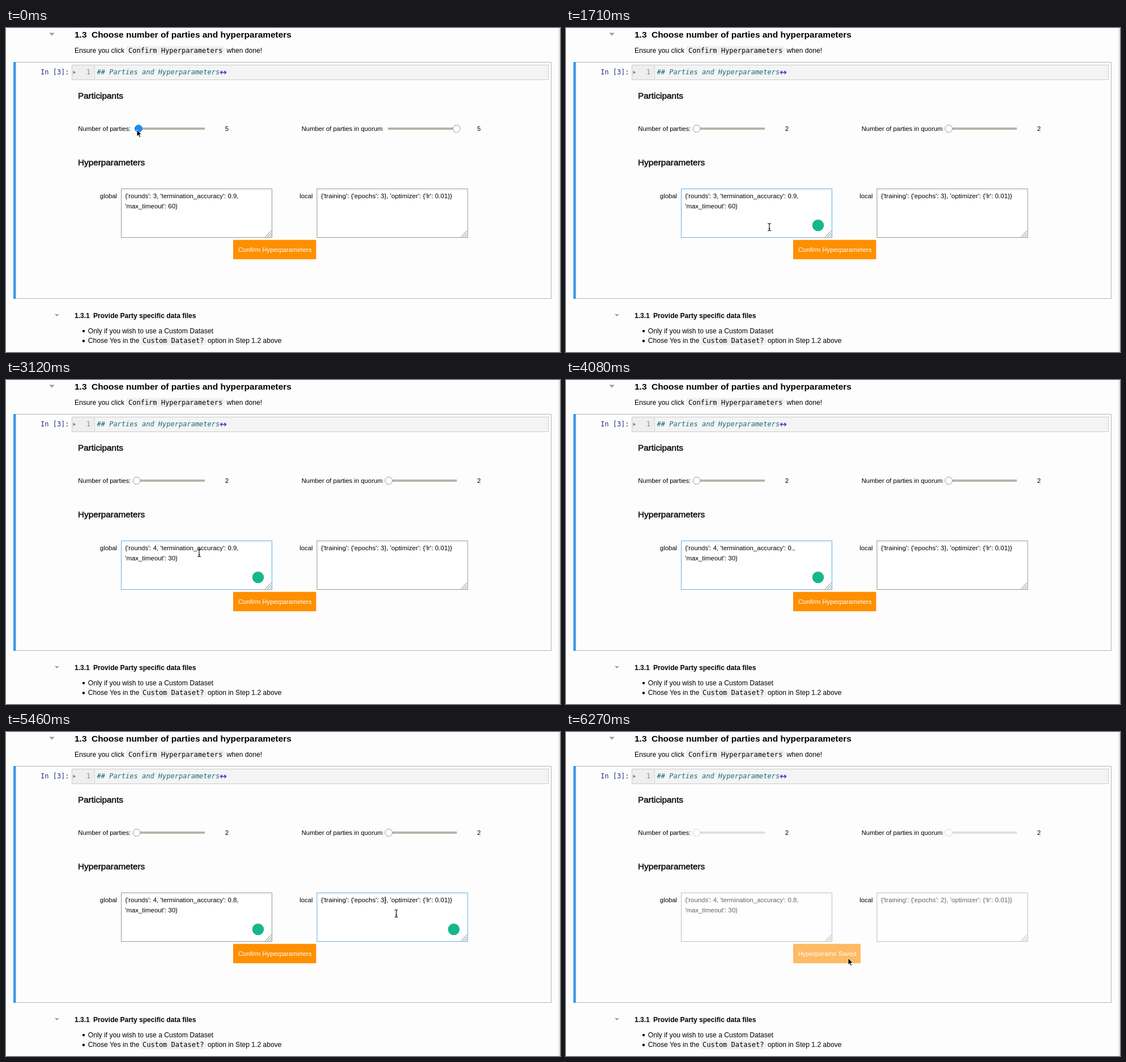
Write an HTML page that moves like this. It is 978 px wide and 573 px high and loops after 6.3 s.

```html
<!DOCTYPE html>
<html lang="en">
<head>
<meta charset="utf-8">
<title>Hyperparameters</title>
<style>
  html, body { margin: 0; width: 100%; height: 100%; overflow: hidden; background: #fdfdfd; }
  svg { display: block; width: 978px; height: 573px; }
  text { font: 11.3px "Liberation Sans", Arial, sans-serif; fill: #000; }
  .body { font-size: 12.1px; }
  .title { font-size: 15.46px; font-weight: bold; }
  .subtitle { font-size: 12.05px; font-weight: bold; }
  .section { font-size: 15.3px; stroke: #000; stroke-width: .4px; }
  .code { font: 12px "DejaVu Sans Mono", monospace; }
  .comment { font-style: italic; fill: #13706c; }
  .label { text-anchor: end; }
  .chip { fill: #f0f0f0; }
  .toggle { fill: #a6a6a6; }
  .track { fill: #b7b6a8; }
  .knob { fill: #fff; stroke: #9b9b9b; }
  .knob.on { fill: #1e8bea; stroke: #1e8bea; }
  .box { fill: #fff; stroke: #969696; }
  .box.on { stroke: #64aeea; }
  .grip { fill: none; stroke: #777; }
  .badge { fill: #15b78b; }
  .button { fill: #ff8f00; }
  .button + text { fill: #fff; }
  .off .dim { opacity: .6; }
  .off .slider { opacity: .42; }
</style>
</head>
<body>
<svg id="stage" viewBox="0 0 978 573">
  <defs>
    <path id="grip" class="grip" d="M0 11L11 0M4 11L11 4M8 11L11 8"/>
  </defs>
  <rect width="978" height="573" fill="#fdfdfd"/>
  <rect x="975" width="3" height="573" fill="#e6e6e6"/>

  <path class="toggle" d="M76 8.5h10l-5 5.5z"/>
  <text class="title" x="121" y="16.8">1.3</text>
  <text class="title" x="151" y="16.8">Choose number of parties and hyperparameters</text>
  <text class="body" x="121" y="44">Ensure you click</text>
  <rect class="chip" x="212" y="32" width="174" height="16" rx="1"/>
  <text class="code" x="216" y="44">Confirm Hyperparameters</text>
  <text class="body" x="389.5" y="44">when done!</text>

  <rect x="13.5" y="60.5" width="949" height="418" fill="none" stroke="#b5b5b5"/>
  <rect x="13" y="60" width="4.5" height="419" fill="#3f9ae8"/>
  <text class="code" x="61" y="82" style="fill:#26317f">In [3]:</text>
  <rect x="116.5" y="65.5" width="841" height="26" fill="#f4f4f4" stroke="#cbcbcb"/>
  <rect x="117" y="66" width="39" height="25" fill="#eee"/>
  <path d="M156.5 66V91" stroke="#d6d6d6"/>
  <path d="M118.5 75.8L123.5 78.5L118.5 81.2z" fill="#888"/>
  <text class="code" x="142" y="82" style="fill:#888">1</text>
  <text class="code comment" x="160.5" y="82">## Parties and Hyperparameters</text>
  <path d="M379 78.5H388M381.5 75.5L378.5 78.5L381.5 81.5M385.5 75.5L388.5 78.5L385.5 81.5" fill="none" stroke="#4126dc" stroke-width="1.4"/>

  <text class="section" x="127" y="124.8">Participants</text>
  <text x="127.3" y="182">Number of parties:</text>
  <g class="slider">
    <rect class="track" x="231" y="176" width="120" height="4"/>
    <circle id="partyKnob" class="knob" cy="178" r="6.5"/>
  </g>
  <text id="partyCount" x="386.7" y="182"></text>
  <text x="521.7" y="182">Number of parties in quorum</text>
  <g class="slider">
    <rect class="track" x="674" y="176" width="122" height="4"/>
    <circle id="quorumKnob" class="knob" cy="178" r="6.5"/>
  </g>
  <text id="quorumCount" x="831.7" y="182"></text>

  <text class="section" x="127" y="242.8">Hyperparameters</text>
  <text class="label" x="196" y="301">global</text>
  <g class="dim">
    <rect id="globalBox" class="box" x="203.5" y="284.5" width="266" height="86"/>
    <use href="#grip" x="457.5" y="358.5"/>
    <text id="rounds" x="210.3" y="301.3" style="font-size:11.42px"></text>
    <text id="timeout" x="210.3" y="318.6" style="font-size:11.42px"></text>
  </g>
  <text class="label" x="541.5" y="301">local</text>
  <g class="dim">
    <rect id="localBox" class="box" x="549" y="284.5" width="266" height="86"/>
    <use href="#grip" x="803" y="358.5"/>
    <text id="training" x="556" y="301.3" style="font-size:11.64px"></text>
  </g>
  <path id="caret" d="M669.5 291V304" stroke="#000"/>
  <circle id="globalBadge" class="badge" cx="445" cy="349" r="10.3"/>
  <circle id="localBadge" class="badge" cx="790.5" cy="349" r="10.3"/>

  <g class="dim">
    <rect id="button" class="button" x="401" y="374.7" height="34.3"/>
    <text id="caption" x="409.7" y="396.2"></text>
  </g>

  <path class="toggle" d="M86 506h8l-4 4.3z"/>
  <text class="subtitle" x="121" y="512.5">1.3.1</text>
  <text class="subtitle" x="154" y="512.5">Provide Party specific data files</text>
  <circle cx="137" cy="536" r="2.2"/>
  <text class="body" x="144.8" y="539.5">Only if you wish to use a Custom Dataset</text>
  <circle cx="137" cy="553.5" r="2.2"/>
  <text class="body" x="144.8" y="557">Chose Yes in the</text>
  <rect class="chip" x="237.5" y="545" width="115" height="16" rx="1"/>
  <text class="code" x="241" y="557">Custom Dataset?</text>
  <text class="body" x="356" y="557">option in Step 1.2 above</text>

  <path id="arrow" d="M0 0V11.6L2.7 9.2L4.6 13.5L6.6 12.6L4.7 8.5H8.4z" fill="#000" stroke="#fff" stroke-width=".9"/>
  <path id="beam" d="M-3 -6.5Q0 -6.5 0 -4.5Q0 -6.5 3 -6.5M0 -4.5V4.5M-3 6.5Q0 6.5 0 4.5Q0 6.5 3 6.5M-1.5 2.5H1.5" fill="none" stroke="#111" stroke-width="1.2"/>
</svg>
<script>
const LOOP = 6300, STEP = 30, start = performance.now();
const el = {};
document.querySelectorAll('[id]').forEach(node => el[node.id] = node);

// Pointer stops: time, x, y
const path = [
  [0, 231, 180], [210, 227, 181], [300, 227, 181], [630, 680, 181], [690, 682, 181],
  [780, 695, 186], [1080, 695, 186], [1500, 360, 345], [1710, 359, 352],
  [1950, 268, 300], [2280, 268, 300], [2550, 293, 317], [2880, 293, 317],
  [3120, 341, 306], [3480, 407, 300], [4290, 407, 300], [4890, 669, 300],
  [5130, 669, 300], [5460, 689, 321], [5760, 689, 321], [6060, 498, 400], [6300, 498, 400]
];
const typing = [[2100, 2280], [2640, 2850], [3840, 4290], [5550, 5760]];

const within = (t, a, b) => t >= a && t < b;
const show = (node, on) => node.style.display = on ? '' : 'none';

// Latest value whose start time has passed: pick(t, first, time, value, ...)
function pick(t, value, ...steps) {
  for (let i = 0; i < steps.length; i += 2) if (t >= steps[i]) value = steps[i + 1];
  return value;
}

function pointerAt(t) {
  const i = path.findIndex(stop => stop[0] > t);
  const [t0, x0, y0] = path[i - 1], [t1, x1, y1] = path[i];
  const p = (t - t0) / (t1 - t0), ease = p * p * (3 - 2 * p);
  return [x0 + (x1 - x0) * ease, y0 + (y1 - y0) * ease];
}

function drawPointer(t) {
  const [x, y] = pointerAt(t);
  const inBox = within(y, 284, 371) && (within(x, 203, 470) || within(x, 548, 816));
  const hidden = typing.some(([a, b]) => within(t, a, b));
  show(el.arrow, !hidden && !inBox);
  show(el.beam, !hidden && inBox);
  for (const node of [el.arrow, el.beam]) node.setAttribute('transform', `translate(${x} ${y})`);
}

function draw(t) {
  const saved = t >= 6120;
  const parties = pick(t, 5, 90, 4, 150, 3, 210, 2);
  el.stage.classList.toggle('off', saved);

  el.partyCount.textContent = el.quorumCount.textContent = parties;
  el.partyKnob.setAttribute('cx', 230.5 + (parties - 2) * 1.17);
  el.quorumKnob.setAttribute('cx', parties > 2 ? 795.5 : 675.5);
  el.partyKnob.classList.toggle('on', t < 960);
  el.quorumKnob.classList.toggle('on', within(t, 660, 1500));

  const rounds = pick(t, '3', 2130, '', 2220, '4');
  const accuracy = pick(t, '9', 3930, '', 4200, '8');
  const seconds = pick(t, '60', 2670, '0', 2790, '30');
  const epochs = pick(t, '3', 5580, '', 5700, '2');
  el.rounds.textContent = `{'rounds': ${rounds}, 'termination_accuracy': 0.${accuracy},`;
  el.timeout.textContent = `'max_timeout': ${seconds}}`;
  el.training.textContent = `{'training': {'epochs': ${epochs}}, 'optimizer': {'lr': 0.01}}`;

  el.globalBox.classList.toggle('on', within(t, 1500, 5010));
  el.localBox.classList.toggle('on', within(t, 5010, 6090));
  show(el.globalBadge, within(t, 1560, 6120));
  show(el.localBadge, within(t, 5070, 6120));
  show(el.caret, within(t, 5040, 5550));

  el.button.setAttribute('width', saved ? 119 : 146.5);
  el.caption.textContent = saved ? 'Hyperparams Saved' : 'Confirm Hyperparameters';
  drawPointer(t);
}

function tick() {
  const t = (performance.now() - start) % LOOP;
  draw(Math.floor(t / STEP) * STEP);
  requestAnimationFrame(tick);
}
tick();
</script>
</body>
</html>
```
